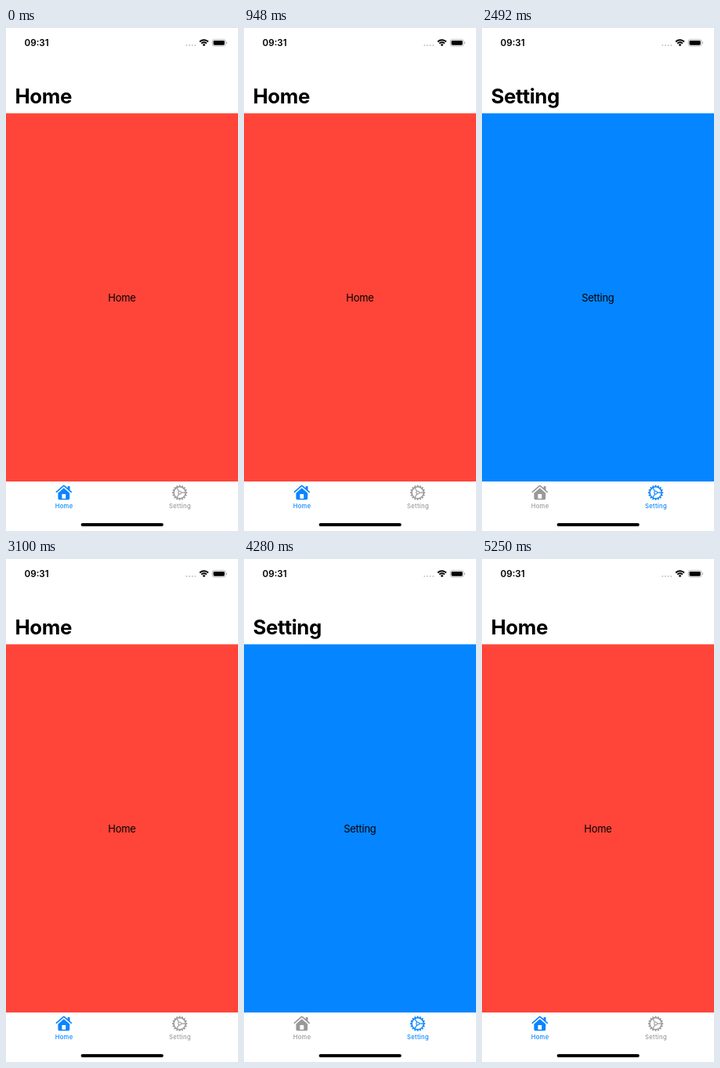
Recreate the animation shown at these times as an HTML page. Size 296 px wide and 640 px high, loop 5360 ms.

```html
<!DOCTYPE html>
<html lang="en">
<head>
<meta charset="utf-8">
<title>Tab bar</title>
<style>
  html, body { margin: 0; width: 100%; height: 100%; overflow: hidden; background: #fff; }
  svg { display: block; width: 100vw; height: 100vh; }
  text { font-family: Inter, "Liberation Sans", sans-serif; }
  .time { font-size: 11.6px; font-weight: 600; }
  .title { font-size: 25.8px; font-weight: 700; letter-spacing: -.42px; }
  .body { font-size: 12.9px; letter-spacing: -.25px; text-anchor: middle; }
  .tab { fill: currentColor; stroke: currentColor; }
  .tab text { font-size: 7.6px; font-weight: 500; letter-spacing: .33px; text-anchor: middle; stroke: none; }
</style>
</head>
<body>
<svg viewBox="0 0 296 640">
  <rect width="296" height="640" fill="#fff"/>

  <text class="time" x="23.6" y="23">09:31</text>
  <g fill="#c4c4c6">
    <circle cx="230.3" cy="22" r="1"/>
    <circle cx="234" cy="22" r="1"/>
    <circle cx="237.7" cy="22" r="1"/>
    <circle cx="241.4" cy="22" r="1"/>
  </g>
  <g fill="none" stroke="#000" stroke-width="1.9">
    <path d="M247.2 17.5a7.7 7.7 0 0 1 10.8 0"/>
    <path d="M249.2 19.7a4.8 4.8 0 0 1 6.8 0"/>
  </g>
  <path d="M250.7 21.2a2.7 2.7 0 0 1 3.8 0l-1.9 2z"/>
  <rect x="263.3" y="14.6" width="16.8" height="8.4" rx="2.5" fill="none" stroke="#a9a9ab" stroke-width=".8"/>
  <rect x="264.6" y="15.9" width="14.2" height="5.8" rx="1.4"/>
  <path d="M281 17.4q1.2.4 1.2 1.4t-1.2 1.4z" fill="#a9a9ab"/>

  <text class="title" id="title" x="11.5" y="96.2"></text>
  <rect id="panel" y="108.5" width="296" height="468.5"/>
  <text class="body" id="body" x="147.9" y="347.6"></text>

  <g class="tab" id="homeTab">
    <g stroke="none">
      <path d="M78.6 583h2.9v6l-2.9-2.6z"/>
      <path fill-rule="evenodd" d="M73.8 585.2l7.4 6.5v6.9q0 1.7-1.7 1.7H68.1q-1.7 0-1.7-1.7v-6.9zM71.4 592.9v5.9h4.8v-5.9z"/>
    </g>
    <path d="M64.4 590.4l8.6-7.6q.8-.7 1.6 0l8.6 7.6" fill="none" stroke-width="1.7" stroke-linecap="round"/>
    <text x="74.1" y="611.1">Home</text>
  </g>

  <g class="tab" id="setTab">
    <g transform="translate(221.6 591.2)" fill="none">
      <circle r="7.5" stroke-width="1.5"/>
      <path id="teeth" stroke-width="1.9"/>
      <circle r="1.9" stroke-width="1.1"/>
      <path id="spokes" stroke-width="1.2"/>
    </g>
    <text x="222" y="611.1">Setting</text>
  </g>

  <rect x="95.6" y="630.1" width="105.2" height="3.9" rx="1.95"/>
</svg>
<script>
const $ = id => document.getElementById(id);
const LOOP = 5360, SWITCHES = [1580, 3100, 4280, 5250];
const ACTIVE = '#0a84ff', IDLE = '#999';
const pages = [
  { name: 'Home', color: '#ff4539' },
  { name: 'Setting', color: '#0585ff' }
];

// Radial strokes between two radii, evenly spaced around the centre
function rays(count, inner, outer) {
  let d = '';
  for (let i = 0; i < count; i++) {
    const a = i / count * 2 * Math.PI, c = Math.cos(a), s = Math.sin(a);
    d += `M${c * inner} ${s * inner}L${c * outer} ${s * outer}`;
  }
  return d;
}
$('teeth').setAttribute('d', rays(16, 7.8, 9.6));
$('spokes').setAttribute('d', rays(3, 2, 7.2));

function draw(ms) {
  const t = ms % LOOP;
  const index = SWITCHES.filter(s => t >= s).length % 2;
  const page = pages[index];
  $('title').textContent = $('body').textContent = page.name;
  $('panel').setAttribute('fill', page.color);
  $('homeTab').style.color = index ? IDLE : ACTIVE;
  $('setTab').style.color = index ? ACTIVE : IDLE;
}

const start = performance.now();
function tick(now) {
  draw(Math.max(0, now - start));
  requestAnimationFrame(tick);
}
draw(0);
requestAnimationFrame(tick);
</script>
</body>
</html>
```
